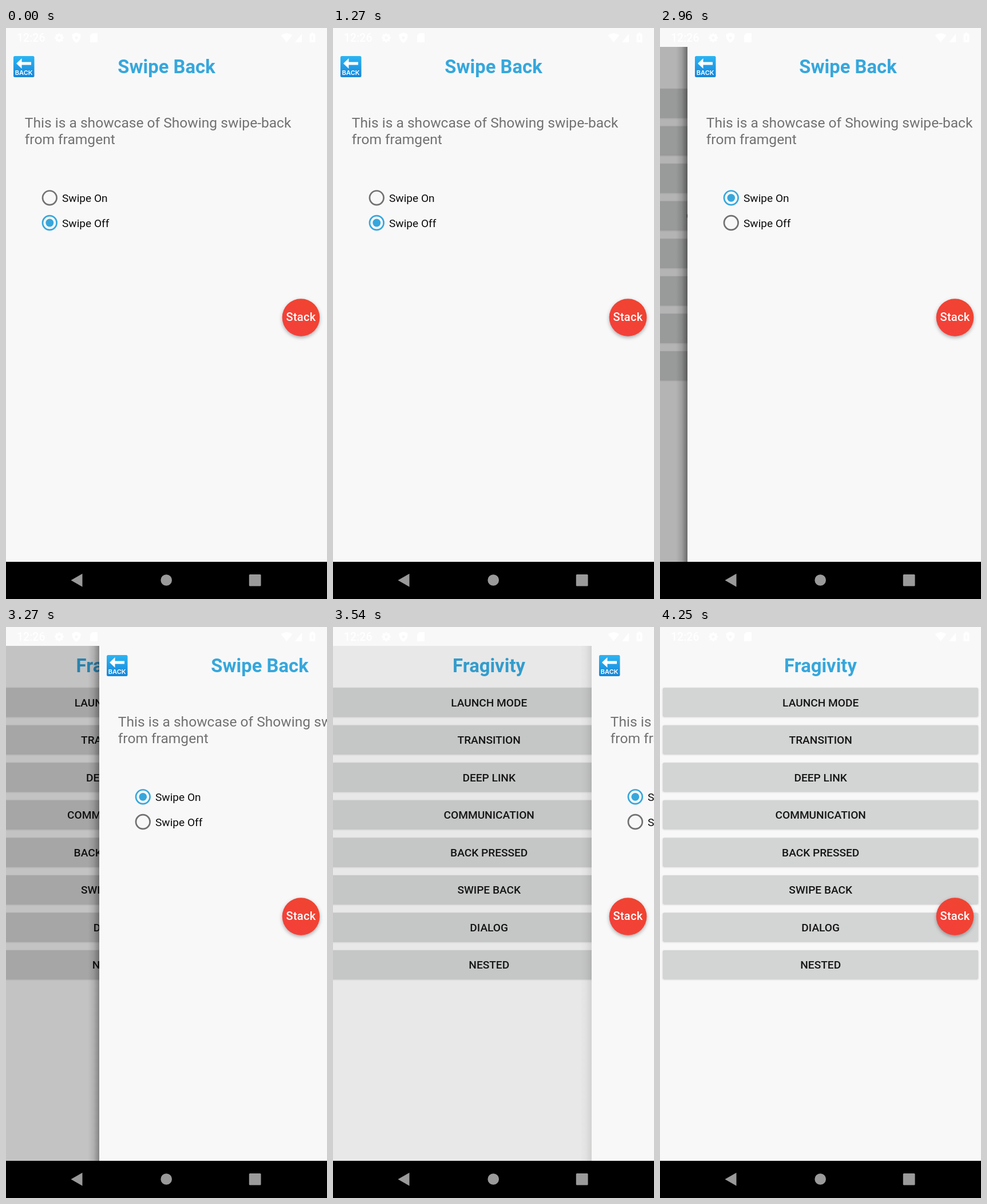
These frames come from a looping animation (561 px wide and 998 px high, 4940 ms). An HTML page with a canvas:

```html
<!DOCTYPE html>
<html lang="en">
<head>
<meta charset="utf-8">
<title>Swipe Back</title>
<style>
html, body { margin: 0; width: 100%; height: 100%; overflow: hidden; background: #f8f8f9; }
canvas { display: block; width: 561px; height: 998px; }
</style>
</head>
<body>
<canvas id="stage" width="561" height="998"></canvas>
<script>
const ctx = document.getElementById('stage').getContext('2d');
const W = 561, TOP = 33, BOTTOM = 933, LOOP = 4940;
const EDGE = 20;                 // width of the shadow beside the sliding page
const BG = '#f8f8f9', BLUE = '#36a7dc', GREY = '#717171';
const ITEMS = ['LAUNCH MODE', 'TRANSITION', 'DEEP LINK', 'COMMUNICATION',
  'BACK PRESSED', 'SWIPE BACK', 'DIALOG', 'NESTED'];

const clamp = (v, lo = 0, hi = 1) => Math.min(hi, Math.max(lo, v));
const lerp = (a, b, p) => a + (b - a) * p;

function text(s, x, y, font, color, align = 'left') {
  ctx.font = font + ', Roboto, sans-serif';
  ctx.fillStyle = color;
  ctx.textAlign = align;
  ctx.fillText(s, x, y);
}

function disc(x, y, r, color) {
  ctx.fillStyle = color;
  ctx.beginPath();
  ctx.arc(x, y, r, 0, Math.PI * 2);
  ctx.fill();
}

function poly(points, color) {
  ctx.fillStyle = color;
  ctx.beginPath();
  points.forEach(([x, y]) => ctx.lineTo(x, y));
  ctx.closePath();
  ctx.fill();
}

function box(x, y, w, h, r, color) {
  ctx.fillStyle = color;
  ctx.beginPath();
  ctx.roundRect(x, y, w, h, r);
  ctx.fill();
}

function shadow(color, blur, dy) {
  ctx.shadowColor = color;
  ctx.shadowBlur = blur;
  ctx.shadowOffsetY = dy;
}

const noShadow = () => shadow('transparent', 0, 0);

const DRAG = [[0, 48], [3, 85], [7, 163], [10, 302], [12, 424], [13, 452]];

function pageX(t) {
  if (t < 2960) return 0;
  if (t < 3810) {
    const k = Math.min(13, Math.floor((t - 2960) / 44.2));
    const i = Math.max(1, DRAG.findIndex(p => p[0] >= k));
    const [k0, x0] = DRAG[i - 1], [k1, x1] = DRAG[i];
    return Math.round(lerp(x0, x1, (k - k0) / (k1 - k0)));
  }
  const tick = 3810 + Math.floor((t - 3810) / 43.3) * 43.3;
  const p = clamp((tick - 3785) / 300);
  return 452 + 139 * (1 - (1 - p) ** 5);
}

function drawList(shift) {
  ctx.save();
  ctx.translate(shift, 0);
  text('Fragivity', 280.5, 79, 'bold 32.77px Roboto', BLUE, 'center');
  ITEMS.forEach((label, i) => {
    const y = 106.3 + i * 65.52;
    shadow('rgba(0,0,0,.22)', 3, 1);
    box(5, y, 551, 50, 2, '#d3d4d4');
    noShadow();
    text(label, 280.7, y + 32.5, '500 19.11px Roboto', '#151515', 'center');
  });
  ctx.restore();
}

function drawRadio(label, y, level) {
  ctx.strokeStyle = level > 0.5 ? BLUE : GREY;
  ctx.lineWidth = 2.73;
  ctx.beginPath();
  ctx.arc(76.3, y, 12.3, 0, Math.PI * 2);
  ctx.stroke();
  if (level > 0) disc(76.3, y, 6.9 * level, BLUE);
  text(label, 98, y + 7.2, '19.11px Roboto', '#0a0a0a');
}

function drawBackIcon() {
  const fill = ctx.createLinearGradient(0, 49, 0, 86);
  fill.addColorStop(0, '#2cb5f3');
  fill.addColorStop(1, '#1685da');
  box(13, 49, 36.5, 37, 2.5, fill);
  poly([[18, 62], [27.5, 53], [27.5, 59.4], [44, 59.4], [44, 64.6], [27.5, 64.6], [27.5, 71]], '#fff');
  text('BACK', 31.2, 82, '600 11px Inter', '#fff', 'center');
}

function drawPage(x, on) {
  ctx.save();
  ctx.translate(x, 0);
  ctx.fillStyle = BG;
  ctx.fillRect(0, TOP, W, BOTTOM - TOP);
  drawBackIcon();
  text('Swipe Back', 280.5, 79, 'bold 32.77px Roboto', BLUE, 'center');
  text('This is a showcase of Showing swipe-back', 32.8, 174.3, '24.57px Roboto', GREY);
  text('from framgent', 32.8, 203, '24.57px Roboto', GREY);
  drawRadio('Swipe On', 296.8, on);
  drawRadio('Swipe Off', 340.5, 1 - on);
  ctx.restore();
}

function drawVeil(x) {
  const left = clamp(1 - x / (W + EDGE));
  const edge = Math.min(x, W);
  ctx.fillStyle = `rgba(0,0,0,${0.3 * left})`;
  ctx.fillRect(0, TOP, edge, BOTTOM - TOP);
  const g = ctx.createLinearGradient(x - EDGE, 0, x, 0);
  g.addColorStop(0, 'rgba(0,0,0,0)');
  g.addColorStop(0.5, `rgba(0,0,0,${0.13 * left})`);
  g.addColorStop(1, `rgba(0,0,0,${0.45 * left})`);
  ctx.fillStyle = g;
  ctx.fillRect(x - EDGE, TOP, EDGE, BOTTOM - TOP);
}

function drawStatus() {
  const white = '#fff';
  ctx.fillStyle = BG;
  ctx.fillRect(0, 0, W, TOP);
  text('12:26', 19, 23.5, '500 19.5px Roboto', white);
  for (let i = 0; i < 8; i++) {
    const a = i * Math.PI / 4;
    disc(93 + 6 * Math.cos(a), 17 + 6 * Math.sin(a), 2, white);
  }
  disc(93, 17, 6, white);
  disc(93, 17, 2.6, BG);
  poly([[123, 8], [130.5, 11], [130, 18], [127, 23], [123, 26], [119, 23], [116, 18], [115.5, 11]], white);
  disc(123, 17, 2.6, BG);
  poly([[151, 9], [160, 9], [160, 25], [147, 25], [147, 13]], white);
  ctx.fillStyle = white;
  ctx.beginPath();
  ctx.moveTo(490.5, 25);
  ctx.lineTo(480.5, 12.5);
  ctx.quadraticCurveTo(490.5, 5.5, 500.5, 12.5);
  ctx.fill();
  poly([[517, 10], [517, 25], [505, 25]], white);
  box(530.5, 10, 10, 15, 1.5, white);
  box(533.5, 8, 4, 3, 0, white);
  box(534.5, 14, 2, 7, 0, BG);
}

function drawFab() {
  const fill = ctx.createLinearGradient(490, 530, 541, 480);
  fill.addColorStop(0, '#f4403a');
  fill.addColorStop(1, '#f04430');
  shadow('rgba(0,0,0,.32)', 6, 2.5);
  disc(515.5, 506, 32.8, fill);
  noShadow();
  ctx.letterSpacing = '0.3px';
  text('Stack', 515.5, 512, '500 20px Roboto', '#fff', 'center');
  ctx.letterSpacing = '0px';
}

function drawNav() {
  const icon = '#9a9a9a';
  ctx.fillStyle = '#000';
  ctx.fillRect(0, BOTTOM, W, 998 - BOTTOM);
  poly([[113.5, 965.3], [133.5, 953.8], [133.5, 976.8]], icon);
  disc(280.2, 965, 9.8, icon);
  box(424.8, 955, 20.8, 20.6, 1.5, icon);
}

function draw(t) {
  const x = pageX(t);
  const on = clamp((t - 1640) / 210);
  ctx.fillStyle = BG;
  ctx.fillRect(0, 0, W, 998);
  if (x > 0) {
    const shift = -0.33 * Math.max(0, W - x) * (1 - x / (W + EDGE));
    drawList(Math.min(0, shift));
    drawVeil(x);
  }
  if (x < W) drawPage(x, on);
  drawStatus();
  drawFab();
  drawNav();
}

const start = performance.now();
function tick() {
  draw((performance.now() - start) % LOOP);
  requestAnimationFrame(tick);
}
tick();
</script>
</body>
</html>
```
